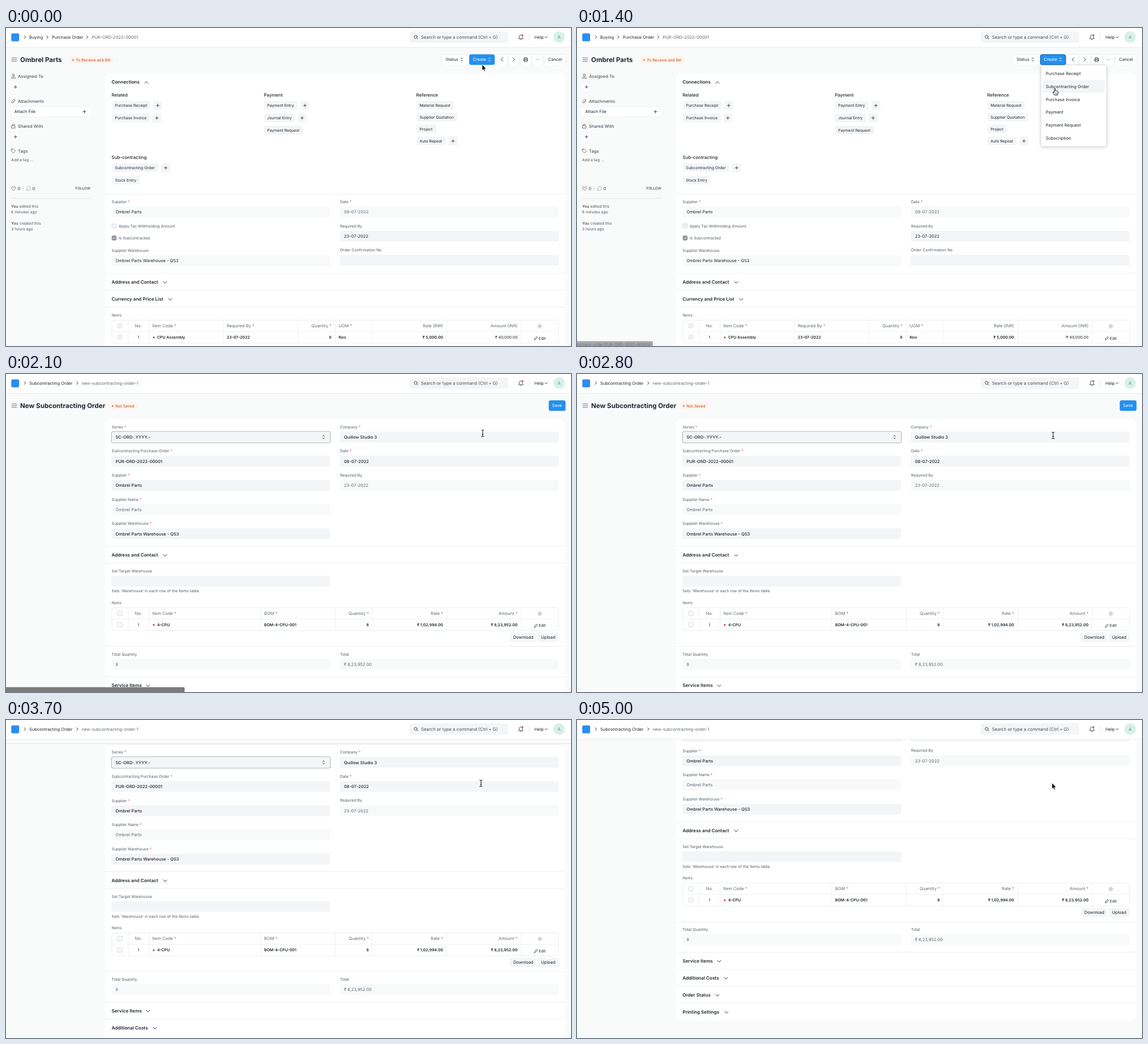
An HTML page for the animation above (5350 ms loop, 998 by 561 pixels).

```html
<!DOCTYPE html>
<html lang="en">
<head>
<meta charset="utf-8">
<title>Subcontracting order</title>
<style>
html, body { margin: 0; width: 100%; height: 100%; overflow: hidden; background: #f9fafa; }
svg { display: block; width: 998px; height: 561px; text-rendering: geometricPrecision; }
text { font: 7.5px Inter, sans-serif; fill: #1f272e; }
.label { font-size: 6.85px; fill: #505a62; }
.small { font-size: 6.9px; }
.title { font-size: 11.57px; font-weight: 700; }
.section { font-size: 8.08px; font-weight: 600; }
.group { font-size: 7.95px; font-weight: 500; }
.side { font-size: 7.6px; font-weight: 500; fill: #505a62; }
.mid { font-size: 7.5px; font-weight: 500; }
.bold { font-size: 6.9px; font-weight: 600; }
.muted { fill: #606a72; }
.orange { font-size: 6.85px; fill: #bd4a1c; }
.white { fill: #fff; }
.end { text-anchor: end; }
.center { text-anchor: middle; }
.icon { fill: none; stroke: #505a62; stroke-width: .8; stroke-linecap: round; stroke-linejoin: round; }
.raised { filter: drop-shadow(0 .4px .7px rgba(0, 0, 0, .22)); }
.float { filter: drop-shadow(0 1px 3px rgba(0, 0, 0, .25)); }
</style>
</head>
<body>
<svg id="stage" viewBox="0 0 998 561"></svg>
<script>
const LOOP = 5350, STEP = 100;
const SUPPLIER = 'Ombrel Parts', STORE = SUPPLIER + ' Warehouse - QS3', COMPANY = 'Quillow Studio 3';
const GREY = '#f4f5f6', PALE = '#f8f9f9', LINE = '#e9ecee', BLUE = '#2490ef', INK = '#1f272e';

const text = (x, y, s, cls = '') => `<text x="${x}" y="${y}" dy=".364em" class="${cls}">` +
  s.replace(/ \*$/, ' <tspan fill="#de5b5b">*</tspan>') + '</text>';
// A rectangle given by its left, top, right and bottom edges
const box = (l, t, r, b, fill, rx = 3, more = '') =>
  `<rect x="${l}" y="${t}" width="${r - l}" height="${b - t}" rx="${rx}" fill="${fill}" ${more}/>`;
const dot = (x, y, r, fill, more = '') => `<circle cx="${x}" cy="${y}" r="${r}" fill="${fill}" ${more}/>`;
const icon = (x, y, d, more = '') => `<path class="icon" transform="translate(${x} ${y})" d="${d}" ${more}/>`;
const hline = (y, l = 175, r = 988, color = LINE) => `<path d="M${l} ${y}H${r}" stroke="${color}" stroke-width=".8"/>`;
const chevron = (x, y, turn = 0, size = 1, color = INK) =>
  `<path class="icon" transform="translate(${x} ${y}) rotate(${turn}) scale(${size})" d="M-3-1.5L0 1.5L3-1.5" style="stroke:${color};stroke-width:${.95 / size}"/>`;
const sorter = (x, y, color = INK) => chevron(x, y - 2.2, 180, .5, color) + chevron(x, y + 2.2, 0, .5, color);
const darkIcon = `style="stroke:${INK}"`;
const plus = (x, y) => icon(x, y, 'M-2.6 0H2.6M0-2.6V2.6', darkIcon);
const raised = (l, t, r, b, rx = 3.5, fill = '#fff') => box(l, t, r, b, fill, rx, 'class="raised"');
const button = (l, r, fill = '#fff') => raised(l - .3, 46.6, r + .3, 65, 3.5, fill);
const check = (x, y, fill, stroke) => box(x - 3.9, y - 3.9, x + 3.9, y + 3.9, fill, 1.8, `stroke="${stroke}" stroke-width=".7"`);

const badge = (l, r, y, s, add) => box(l, y - 7.6, r, y + 7.6, GREY) + text(l + 5.6, y, s, 'small') +
  (add ? box(add - 8, y - 7.8, add + 8, y + 8.4, GREY) + plus(add, y + .4) : '');
const field = (l, y, s, value, cls = 'mid', fill = GREY) =>
  text(l, y, s, 'label') + box(l - .5, y + 8.3, l + 386, y + 27.3, fill, 3.5) + text(l + 7, y + 17.9, value, cls);
const section = (y, s, x) => text(186.5, y, s, 'section') + chevron(x, y + .5);
const burger = icon(14.5, 55.8, 'M-4.4-3H4.4M-4.4 0H4.4M-4.4 3H4.4');
const crumbs = (first, x, last, gap, middle = '') => text(41, 16, first) + middle + chevron(x, 16, -90, .8) + text(x + gap, 16, last, 'muted');
const status = (l, r, s) => box(l, 50, r, 62.3, '#fff3ec', 5) + dot(l + 6.4, 56.4, 1.2, '#bd4a1c') + text(l + 11.3, 56.2, s, 'orange');

// Grid with a header and one row; cells are [x, heading, value, class]
function grid(y, columns, cells, fill, stroke) {
  const mid = y + 10, row = y + 30;
  return text(186.5, y - 8.8, 'Items', 'label') +
    box(187, y, 976, y + 40.3, '#fff', 3, `stroke="${LINE}" stroke-width=".9"`) + hline(y + 20, 187, 976) +
    columns.map(x => `<path d="M${x} ${y}v40.3" stroke="${LINE}" stroke-width=".8"/>`).join('') +
    check(201, mid, fill, stroke) + check(201, row, fill, stroke) +
    text(234, mid, 'No.', 'muted center') + text(234, row, '1', 'small center') +
    cells.map(([x, head, value, cls]) => text(x, mid, head, 'muted ' + (/end/.test(cls) ? 'end' : '')) +
      text(x === 258.5 ? 267 : x, row + .2, value, cls)).join('') +
    dot(261, row + .5, 1.6, '#cb4a3a') +
    dot(943, mid + .6, 3.1, 'none', 'stroke="#7c858d" stroke-width=".9" stroke-dasharray="1.6 .8"') +
    dot(943, mid + .6, 1.2, 'none', 'stroke="#7c858d" stroke-width=".7"') +
    icon(936, row + 1.8, 'M-2.7 2.7L-2.1 .6L1.3-2.8L2.8-1.3L-.6 2.1Z', darkIcon) + text(941, row + 1.7, 'Edit', 'small') +
    box(890, y + 44.3, 936.5, y + 59.8, GREY) + text(896, y + 52, 'Download') +
    box(939, y + 44.3, 976, y + 59.8, GREY) + text(945, y + 52, 'Upload');
}

const sidebar =
  dot(13, 83, 1.8, 'none', 'class="icon"') + icon(13, 85, 'M-3.4 3.4V2.5Q-3.4 1 0 1Q3.4 1 3.4 2.5V3.4Z') + text(21, 85.2, 'Assigned To', 'side') +
  icon(13, 129, 'M2.8-1L-.4 2.6Q-2 3.8-3 2.5Q-3.8 1.3-2.6 0L.6-3.1Q1.7-3.8 2.5-2.8Q3-1.9 2.2-1L-.8 2') + text(21, 129.2, 'Attachments', 'side') +
  icon(13, 173, 'M-3-.6H3V3.6H-3ZM-1.7-.6V-2Q-1.5-3.6 0-3.6Q1.5-3.6 1.7-2V-.6') + text(21, 173.2, 'Shared With', 'side') +
  icon(13, 217, 'M-3.5-3.5H0L3.7 .2L.2 3.7L-3.5 0ZM-1.8-1.8h.1') + text(21, 217.2, 'Tags', 'side') +
  [104, 192].map(y => raised(8.7, y - 8, 24.9, y + 8, 8) + plus(16.8, y)).join('') +
  raised(9, 138.8, 149, 156.3) + text(14.5, 147.6, 'Attach File') + plus(138.5, 147.6) +
  text(9, 233, 'Add a tag ...', 'label') +
  icon(13.2, 283, 'M0 3.4L-3.2 .2Q-4.4-1.7-2.7-2.9Q-1.2-3.4 0-1.8Q1.2-3.4 2.7-2.9Q4.4-1.7 3.2 .2Z') + text(20.5, 283.2, '0', 'side') +
  text(29, 283, '·', 'side') + icon(40, 283, 'M-3.4 3.2V-.2A3.4 3.4 0 1 1 0 3.2Z', 'style="stroke:#98a1a9"') + text(46.5, 283.2, '0', 'side') +
  '<text x="122.5" y="283" dy=".364em" style="font-size:6.25px">FOLLOW</text>' +
  hline(300.5, 9, 149, '#dfe3e6') +
  text(9, 314.7, '<tspan font-weight="600">You</tspan> edited this', 'label') + text(9, 325, '6 minutes ago', 'label') +
  text(9, 344.3, '<tspan font-weight="600">You</tspan> created this', 'label') + text(9, 354.7, '3 hours ago', 'label');

const toolbar =
  button(770, 814) + text(776.5, 55.5, 'Status') + sorter(805, 55.6) +
  button(818.5, 863, BLUE) + text(824.5, 55.5, 'Create', 'white') + sorter(854, 55.6, '#fff') +
  [867, 888, 909, 930].map(x => button(x, x + 18)).join('') +
  chevron(876, 55.6, 90) + chevron(897, 55.6, -90) +
  icon(918, 55.6, 'M-2.2-1.2V-3.5H2.2V-1.2M-2.2 2H-3.5V-1.2H3.5V2H2.2M-2.2 .8H2.2V3.6H-2.2Z', darkIcon) +
  [936.6, 939, 941.4].map(x => dot(x, 55.8, .55, '#333c44')).join('') +
  button(951, 988) + text(957.5, 55.5, 'Cancel');

const orderPage = burger + text(25, 55.5, SUPPLIER, 'title') + status(112, 190, 'To Receive and Bill') + toolbar + sidebar +
  raised(175, 80, 988, 600, 5) + text(186.5, 95.5, 'Connections', 'section') + chevron(248, 96, 180) +
  text(186.5, 118, 'Related', 'group') + text(455.5, 118, 'Payment', 'group') + text(724.5, 118, 'Reference', 'group') +
  text(186.5, 228, 'Sub-contracting', 'group') +
  badge(187, 255, 136.3, 'Purchase Receipt', 268) + badge(187, 254, 158.3, 'Purchase Invoice', 266.5) +
  badge(455.7, 515, 136.3, 'Payment Entry', 528) + badge(455.7, 510.5, 158.3, 'Journal Entry', 523) + badge(455.7, 525, 180.3, 'Payment Request') +
  badge(724.8, 791, 136.3, 'Material Request') + badge(724.8, 797, 157.2, 'Supplier Quotation') +
  badge(724.8, 760, 178, 'Project') + badge(724.8, 777, 199, 'Auto Repeat', 789.5) +
  badge(187, 269.3, 246.3, 'Subcontracting Order', 282) + badge(187, 236, 268.3, 'Stock Entry') +
  hline(293) + field(186.5, 306.5, 'Supplier *', SUPPLIER, '', PALE) + field(590, 306.5, 'Date *', '08-07-2022', 'muted', PALE) +
  check(191, 349.2, '#f1f2f3', '#c9ced2') + text(199, 349.2, 'Apply Tax Withholding Amount', 'label') +
  check(191, 370.5, '#8b949b', '#8b949b') + icon(191, 370.5, 'M-2 .1L-.6 1.5L2-1.5', 'style="stroke:#fff;stroke-width:1"') +
  text(199, 370.5, 'Is Subcontracted', 'label') +
  field(590, 349.4, 'Required By', '23-07-2022', '') + field(186.5, 392.7, 'Supplier Warehouse', STORE, '', PALE) +
  field(590, 392, 'Order Confirmation No', '') +
  hline(432.5) + section(448.2, 'Address and Contact', 281) + hline(462.5) + section(478.3, 'Currency and Price List', 290) + hline(492.5) +
  grid(515.4, [216, 253, 384, 515.5, 581.5, 646.5, 778.5, 910], [
    [258.5, 'Item Code *', 'CPU Assembly', 'bold'], [390, 'Required By *', '23-07-2022', 'bold'],
    [575, 'Quantity *', '8', 'bold end'], [587.5, 'UOM *', 'Nos', 'bold'],
    [772, 'Rate (INR)', '₹ 5,000.00', 'bold end'], [903.5, 'Amount (INR)', '₹ 40,000.00', 'small end']], '#f1f2f3', '#d3d8db') +
  `<g id="menu">${box(818.6, 47, 863, 64.7, 'none', 3.5, 'stroke="#1769b5" stroke-width="1.1"')}
  ${box(820, 66, 935, 208.5, '#fff', 4, 'class="float"')}${box(822.5, 0, 932.5, 22.6, GREY, 3, 'id="hover"')}` +
  ['Purchase Receipt', 'Subcontracting Order', 'Purchase Invoice', 'Payment', 'Payment Request', 'Subscription']
    .map((s, i) => text(828, 80 + i * 22.9, s)).join('') + '</g>';

const subPage = raised(175, 80, 988, 654.5, 5) + burger + text(25, 55.5, 'New Subcontracting Order', 'title') + status(182, 232.5, 'Not Saved') +
  button(959, 988, BLUE) + text(964.5, 55.5, 'Save', 'white') +
  `<g id="headline">${hline(78, 0, 998, '#dde1e4')}</g>` +
  field(186.5, 93.4, 'Series *', 'SC-ORD-.YYYY.-') + box(186.3, 101.3, 573.1, 121.5, 'none', 3.5, 'stroke="#b0b7bc" stroke-width="1.1"') + sorter(561, 111.3) +
  field(186.5, 136, 'Subcontracting Purchase Order *', 'PUR-ORD-2022-00001') + field(186.5, 178.7, 'Supplier *', SUPPLIER) +
  field(186.5, 221.3, 'Supplier Name *', SUPPLIER, 'muted', PALE) + field(186.5, 264, 'Supplier Warehouse *', STORE) +
  field(590, 93.4, 'Company *', COMPANY) + field(590, 136, 'Date *', '08-07-2022') +
  field(590, 178.4, 'Required By', '23-07-2022', 'muted', PALE) +
  hline(304) + section(319.5, 'Address and Contact', 281) + hline(334) +
  field(186.5, 347.8, 'Set Target Warehouse', '') + text(186.5, 383, "Sets 'Warehouse' in each row of the Items table.", 'label') +
  grid(412.2, [216, 253, 450, 581.5, 646.5, 778.5, 910], [
    [258.5, 'Item Code *', '4-CPU', 'bold'], [456, 'BOM *', 'BOM-4-CPU-001', 'bold'], [641, 'Quantity *', '8', 'bold end'],
    [772, 'Rate *', '₹ 1,02,994.00', 'bold end'], [903.5, 'Amount *', '₹ 8,23,952.00', 'bold end']], '#fff', '#b9c0c6') +
  hline(480.5) + field(186.5, 494.3, 'Total Quantity', '8', 'muted', PALE) + field(590, 494.3, 'Total', '₹ 8,23,952.00', 'muted', PALE) +
  [['Service Items', 251], ['Additional Costs', 263], ['Order Status', 248], ['Printing Settings', 264]]
    .map(([s, x], i) => hline(534 + i * 30.1) + section(549.5 + i * 30.1, s, x)).join('');

const nav = box(0, 0, 998, 34, '#fff', 0) + hline(34.2, 0, 998, '#e4e8ea') +
  box(9.3, 9.6, 23.2, 23.6, '#2d8cf0', 2.5) + chevron(33.5, 16, -90, .8) +
  `<g id="crumbsA">${crumbs('Buying', 143.5, 'PUR-ORD-2022-00001', 8, chevron(73, 16, -90, .8) + text(81, 16, 'Purchase Order'))}</g>` +
  `<g id="crumbsB">${crumbs('Subcontracting Order', 126, 'new-subcontracting-order-1', 7.7)}</g>` +
  box(713, 6, 887, 26.2, GREY, 4) + dot(723.6, 15.6, 2.7, 'none', `class="icon" ${darkIcon}`) + icon(725.6, 17.6, 'M0 0L1.9 1.9', darkIcon) +
  '<text x="733" y="16" dy=".364em" style="font-size:7.78px;fill:#454e56">Search or type a command (Ctrl + G)</text>' +
  icon(909.5, 16, 'M-3.8 2.6Q-2.7 1.4-2.7-.8Q-2.6-3.8 0-4Q2.6-3.8 2.7-.8Q2.7 1.4 3.8 2.6ZM-1 4.1Q0 5 1 4.1', darkIcon) + dot(912.4, 12.6, 1.5, '#e24c4c') +
  '<path d="M924.5 10V23" stroke="#dfe3e6" stroke-width=".8"/>' + text(933.5, 16, 'Help') + chevron(954, 16.3, 0, .65) +
  dot(977, 16, 10.2, '#d9f0e6') + '<text x="977" y="16" dy=".364em" class="center" style="font-size:8px;fill:#4d9f80">A</text>';

const pointers = {
  arrow: '<path d="M0 0V10.6L2.4 8.4L4 12L5.7 11.2L4.2 7.8H7.3Z" fill="#000" stroke="#fff" stroke-width=".7"/>',
  hand: '<path d="M-1 1Q0-.4 1 1V4.6Q2.2 3.9 2.7 4.9Q4 4.3 4.3 5.3Q5.8 5 5.8 6.5V8.5L4.7 12H-.6L-3.3 7.9Q-3.6 6.2-1.9 6.7L-1 7.6Z" fill="#fff" stroke="#000" stroke-width=".9"/><path d="M1.2 8V10.3M2.6 8V10.3M4 8V10.3" stroke="#000" stroke-width=".5"/>',
  beam: '<path d="M-2.6-5.8Q0-5.8 0-4.4Q0-5.8 2.6-5.8M0-4.4V4.4M-2.6 5.8Q0 5.8 0 4.4Q0 5.8 2.6 5.8M-1.2 1.8H1.2" fill="none" stroke="#111" stroke-width="1"/>'
};

stage.innerHTML = `<g id="pageA">${orderPage}</g><g id="pageB">${subPage}</g>${nav}
  <g id="bubble"><rect id="bubbleBox" x="-3" y="552.4" height="12" rx="2" fill="#7b7b7b"/>
  <text id="bubbleText" x="130.5" y="558.3" dy=".364em" class="end" style="font-size:7.1px;fill:#333">purchase-order/PUR-ORD-2022-00001#</text></g>
  <g id="pointer">${Object.entries(pointers).map(([k, s]) => `<g id="${k}">${s}</g>`).join('')}</g>`;

const el = id => document.getElementById(id);
const show = (id, on) => { el(id).style.display = on ? '' : 'none'; };
const shift = (id, x, y) => el(id).setAttribute('transform', `translate(${x} ${y})`);
const latest = (t, keys) => keys.filter(k => k[0] <= t).pop()[1];
// Linear path through [time, value] points
function along(t, keys) {
  const i = keys.findIndex(k => k[0] > t);
  if (i < 0) return keys[keys.length - 1][1];
  if (!i) return keys[0][1];
  const [a, u] = keys[i - 1], [b, v] = keys[i];
  return u + (v - u) * (t - a) / (b - a);
}

function draw(now) {
  const t = Math.floor(now % LOOP / STEP) * STEP;
  const second = t >= 1900;
  show('pageA', !second); show('crumbsA', !second);
  show('pageB', second); show('crumbsB', second);

  const scroll = along(t, [[3100, 0], [3300, 8], [3400, 15], [3700, 36.5], [3800, 74], [3900, 108], [4000, 124.5]]);
  shift('pageB', 0, -scroll);
  show('headline', scroll > 0);

  const kind = latest(t, [[0, 'arrow'], [200, 'hand'], [1600, 'arrow'], [1900, 'beam'], [3300, 'arrow'], [3600, 'beam'], [5000, 'arrow']]);
  const x = along(t, [[0, 841], [700, 841], [1200, 844], [1800, 844], [1900, 842], [2700, 842], [2800, 841], [3000, 841], [3300, 839]]);
  const y = along(t, [[0, 64.3], [200, 62.5], [600, 62.5], [800, 76], [1000, 97], [1200, 106.3], [1800, 106.3], [1900, 104.6],
    [2700, 104.6], [2800, 108.4], [3000, 108.4], [3300, 110.6], [3500, 110.6], [3600, 111.7], [4900, 111.7], [5000, 111]]);
  for (const k in pointers) show(k, k === kind);
  shift('pointer', x, y);

  show('menu', t >= 400 && t < 1600);
  show('hover', y >= 68);
  el('hover').setAttribute('y', y < 91 ? 68.7 : 91.6);

  show('bubble', t >= 1300 && t < 2300);
  el('bubble').style.opacity = along(t, [[1300, .3], [1400, .65], [1500, 1]]);
  el('bubbleBox').setAttribute('width', second ? 318.5 : 137);
  show('bubbleText', !second);
  requestAnimationFrame(draw);
}
requestAnimationFrame(draw);
</script>
</body>
</html>
```
